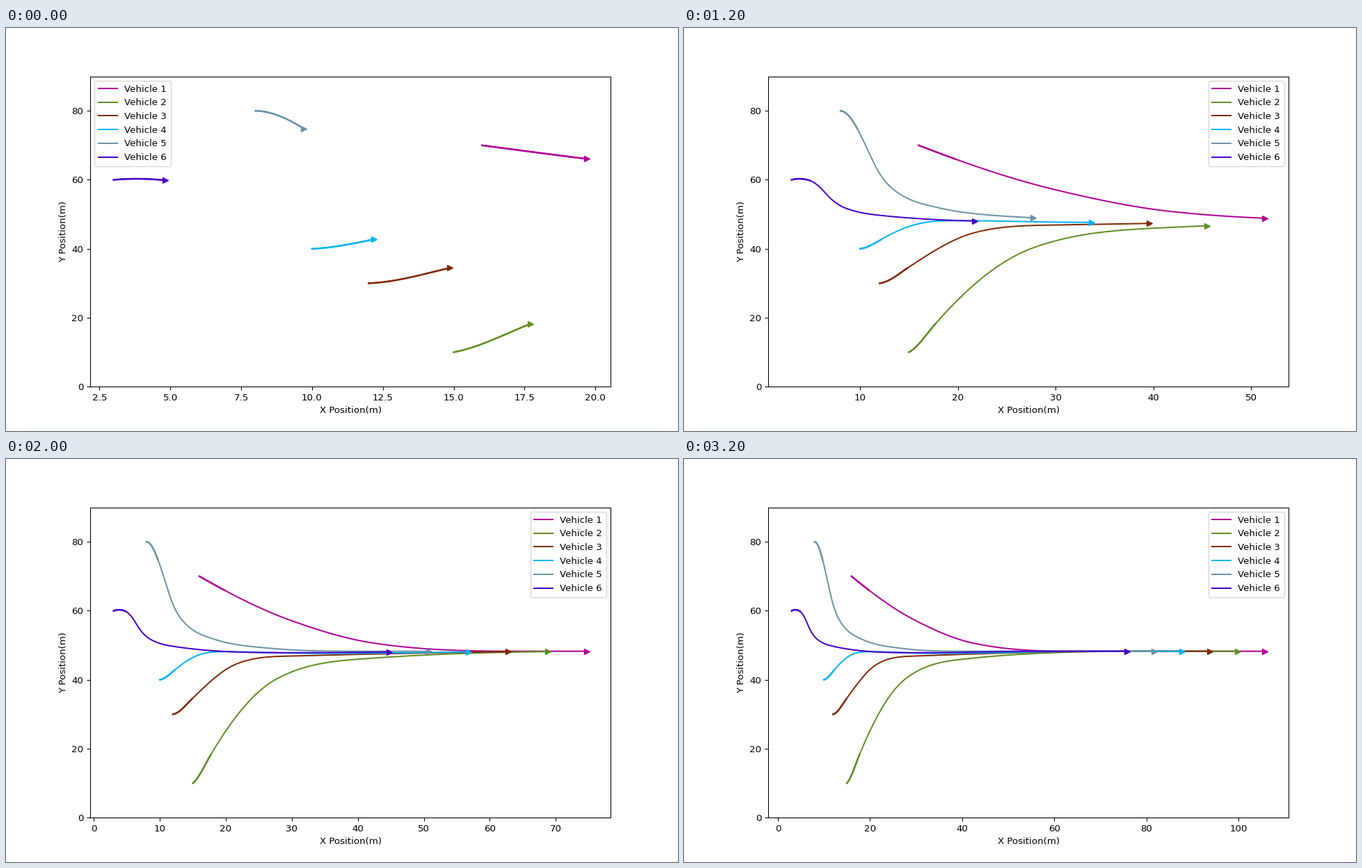
A matplotlib script for the animation above (3300 ms loop, 966 px wide and 580 px high).

```python
import numpy as np
import matplotlib.pyplot as plt
from matplotlib.animation import FuncAnimation

FRAMES, INTERVAL = 33, 100
LANE = 48.27   # common y of the platoon
GAP = 6.0      # final spacing in metres
CLOSING = 0.32  # rate at which spacing errors fade, per frame

# smooth travel of the leading vehicle
lead = np.poly1d(np.polyfit([0, 8, 12, 16, 20, 24, 32],
                            [19.71, 40.62, 51.41, 63.04, 74.71, 86.03, 105.8],
                            5))

plt.rcParams.update({"font.family": "DejaVu Sans", "font.size": 10.06})
fig, ax = plt.subplots(figsize=(966 / 96, 580 / 96), dpi=96)
ax.set_ylim(0, 90)
ax.set_yticks(range(0, 81, 20))
ax.set_xlabel("X Position(m)")
ax.set_ylabel("Y Position(m)")


def hermite(keys, x):
    """Cubic curve through (x, y, slope) keys, flat after the last one."""
    xs, ys, ms = np.array(keys, float).T
    x = np.minimum(x, xs[-1])
    k = np.clip(np.searchsorted(xs, x, side="right") - 1, 0, len(xs) - 2)
    h = xs[k + 1] - xs[k]
    t = (x - xs[k]) / h
    return ((1 + 2 * t) * (1 - t) ** 2 * ys[k]
            + t * (1 - t) ** 2 * h * ms[k]
            + t * t * (3 - 2 * t) * ys[k + 1]
            + t * t * (t - 1) * h * ms[k + 1])


class Vehicle:
    def __init__(self, index, color, first, merge, *keys):
        self.keys = [*keys, (merge, LANE, 0)]
        self.x0 = keys[0][0]
        self.offset = GAP * index
        self.error = first - (lead(0) - self.offset)
        start = np.linspace(self.x0, first, 120)
        ax.plot(start, hermite(self.keys, start), color=color, lw=1.9)
        self.line, = ax.plot([], [], color=color, lw=1.5,
                             label=f"Vehicle {index + 1}")
        self.head, = ax.plot([], [], ">", color=color, ms=6)

    def move(self, t):
        front = lead(t) - self.offset + self.error * np.exp(-CLOSING * t)
        x = np.linspace(self.x0, front, 600)
        y = hermite(self.keys, x)
        self.line.set_data(x, y)
        self.head.set_data(x[-1:], y[-1:])
        return front


# index, colour, first x reached, x where the lane is joined, path keys
vehicles = [
    Vehicle(0, "#b00096", 19.71, 64,
            (16, 70, -1.1), (30, 57.1, -0.68), (42, 50.75, -0.3)),
    Vehicle(1, "#5f8f22", 17.71, 80,
            (15, 10, 1.5), (17.7, 18.2, 3.25), (27.6, 40.15, 1.05),
            (41.8, 46.2, 0.14)),
    Vehicle(2, "#802a06", 14.86, 75,
            (12, 30, 0.3), (15, 34.7, 1.85), (21.5, 44.5, 0.8),
            (29.2, 46.85, 0.05)),
    Vehicle(3, "#00b4f5", 12.2, 70,
            (10, 40, 0.3), (12.2, 42.75, 1.65), (16.5, 47.55, 0.5),
            (20, 48.15, 0), (33, 47.65, 0)),
    Vehicle(4, "#6a93aa", 9.72, 42,
            (8, 80, -0.1), (9.7, 74.9, -5.1), (11.7, 63.3, -5.3),
            (13.5, 57, -2.2), (18, 51.9, -0.65), (27.2, 49.05, -0.17)),
    Vehicle(5, "#4800c8", 4.83, 56,
            (3, 60, 0.7), (4.8, 59.85, -0.9), (6.4, 56.3, -3.3),
            (8.5, 51.8, -1.1), (12, 49.7, -0.3), (32, 47.85, 0)),
]
ax.legend(loc="best")


def update(t):
    right = max(v.move(t) for v in vehicles)
    left = min(v.x0 for v in vehicles)
    pad = 0.05 * (right - left)
    ax.set_xlim(left - pad, right + pad)
    return []


anim = FuncAnimation(fig, update, frames=FRAMES, interval=INTERVAL,
                     repeat=True, repeat_delay=0, blit=False)
plt.show()
```
